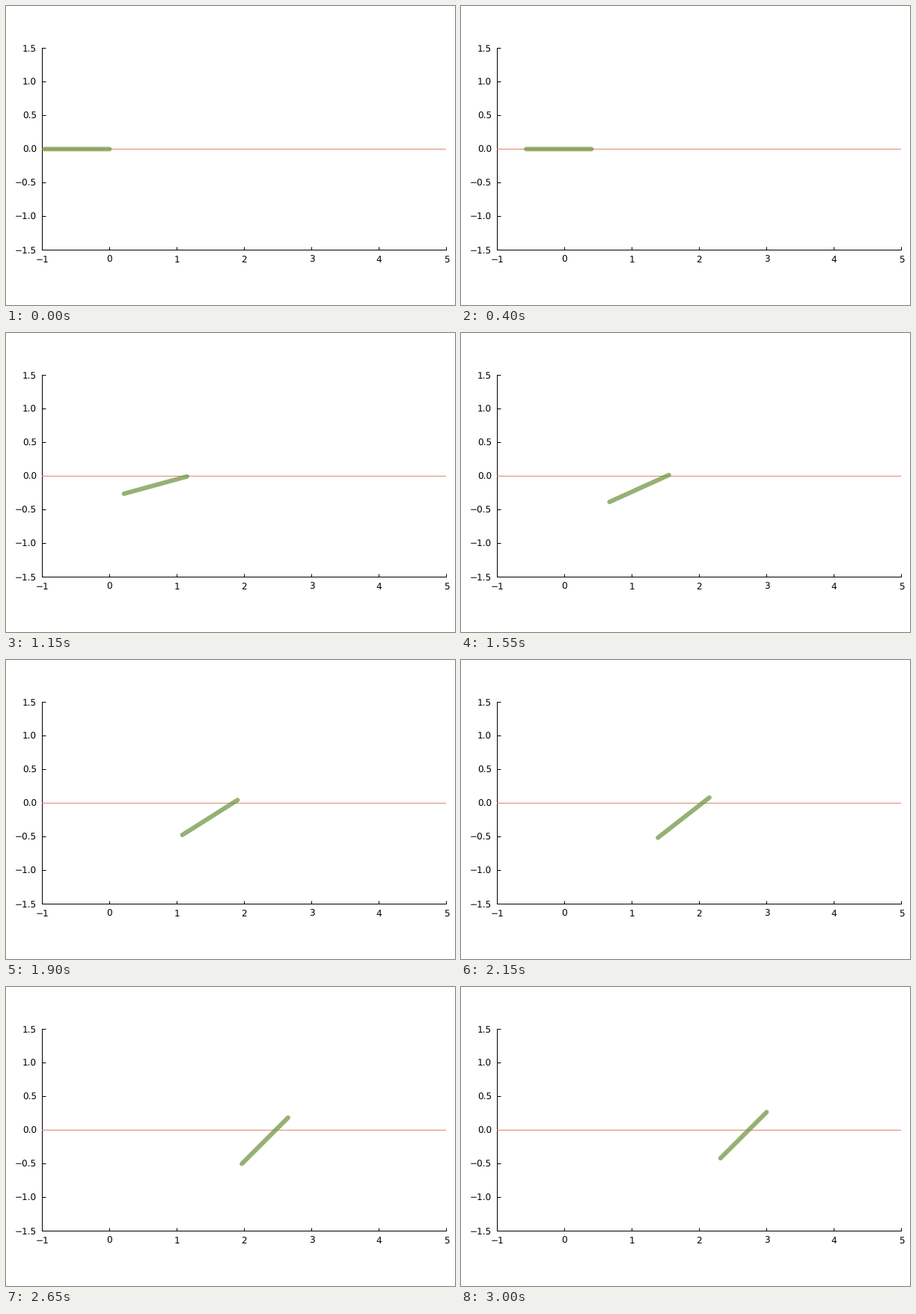
Write a matplotlib script that moves like this. It is 600 px wide and 400 px high and loops after 3.05 s.

```python
import numpy as np
import matplotlib.pyplot as plt
from matplotlib.animation import FuncAnimation

W, H, DPI = 600, 400, 100
PX = 72 / DPI
FRAMES, STEP_MS = 61, 50
LENGTH = 0.97

plt.rcParams["font.family"] = "DejaVu Sans"
plt.rcParams["text.hinting"] = "none"

# Height of the leading edge: time, y
HEAVE = np.array([
    (0, 0), (0.5, 0), (0.7, 0.006), (1.15, -0.006), (1.55, 0.016),
    (1.9, 0.045), (2.35, 0.119), (2.75, 0.208), (3, 0.267),
])


def hermite(points, t):
    """Smooth curve through the points, evaluated at t."""
    x, y = points.T
    slope = np.gradient(y, x)
    slope[:2] = 0
    i = min(np.searchsorted(x, t, side="right") - 1, len(x) - 2)
    h = x[i + 1] - x[i]
    s = (t - x[i]) / h
    return ((1 + 2 * s) * (1 - s) ** 2 * y[i] + s * (1 - s) ** 2 * h * slope[i]
            + s * s * (3 - 2 * s) * y[i + 1] + s * s * (s - 1) * h * slope[i + 1])


def plate_ends(t):
    """Plate moving right at unit speed while pitching up to 45 degrees."""
    pitch = np.clip(0.396 * (t - 0.475), 0, np.pi / 4)
    y = hermite(HEAVE, t)
    return ([t - LENGTH * np.cos(pitch), t],
            [y - LENGTH * np.sin(pitch), y])


fig = plt.figure(figsize=(W / DPI, H / DPI), dpi=DPI, facecolor="white")
left, right, top, bottom = 48.4, 588.4, 56.4, 326.4
ax = fig.add_axes([left / W, 1 - bottom / H,
                   (right - left) / W, (bottom - top) / H])
ax.set_xlim(-1, 5)
ax.set_ylim(-1.5, 1.5)
ax.set_xticks(range(-1, 6))
ax.set_yticks(np.arange(-1.5, 1.6, 0.5))
ax.yaxis.set_major_formatter("{x:.1f}")
ax.tick_params(direction="in", width=PX, labelsize=12 * PX)
ax.tick_params(axis="x", length=4 * PX, pad=7.5 * PX)
ax.tick_params(axis="y", length=5 * PX, pad=7.5 * PX)
for side in ("top", "right"):
    ax.spines[side].set_visible(False)
for side in ("left", "bottom"):
    ax.spines[side].set_linewidth(PX)

ax.plot([-1, 5], [0, 0], color="#d98a6c", lw=PX, zorder=2.6)
plate, = ax.plot([], [], color="#6a903a", alpha=0.7, lw=6 * PX, snap=False,
                 solid_capstyle="round", clip_on=False, zorder=3)


def update(i):
    plate.set_data(*plate_ends(i * STEP_MS / 1000))
    return plate,


anim = FuncAnimation(fig, update, frames=FRAMES, interval=STEP_MS,
                     repeat=True, repeat_delay=0)
plt.show()
```
